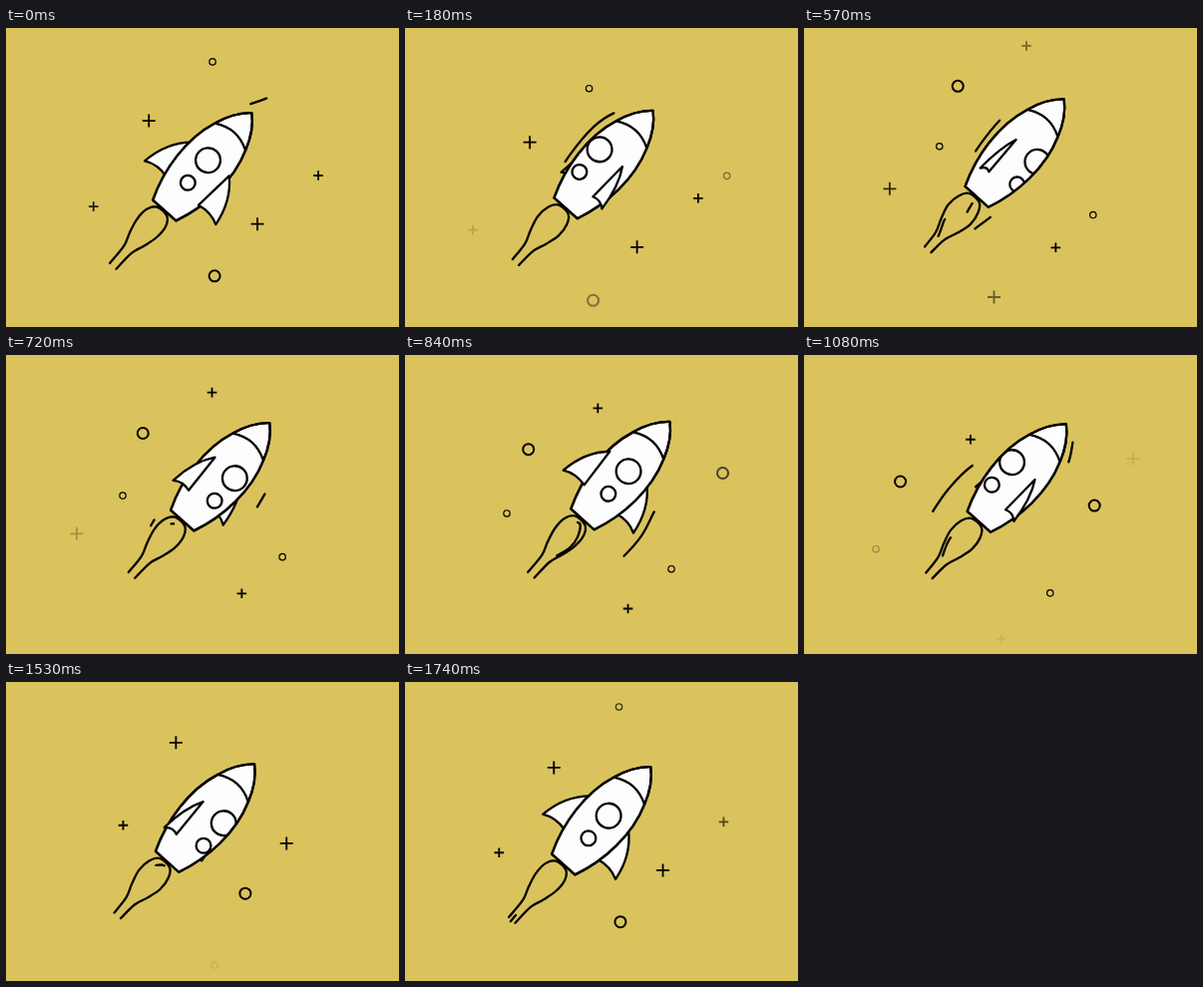
Recreate the animation shown at these times as an HTML page. Size 394 by 300 pixels, loop 1770 ms.

```html
<!DOCTYPE html>
<html lang="en">
<head>
<meta charset="utf-8">
<title>Rocket</title>
<style>
  html, body { margin: 0; width: 100%; height: 100%; overflow: hidden; background: #dac25d; }
  svg { display: block; width: 100vw; height: 100vh; }
  path, circle { fill: none; stroke: #000; stroke-width: 2.3; stroke-linecap: round; stroke-linejoin: round; }
  .solid { fill: #fdfdfd; }
  #sky path { stroke-linecap: butt; }
</style>
</head>
<body>
<svg viewBox="0 0 394 300">
  <defs><clipPath id="hull"><path id="hullShape"/></clipPath></defs>
  <g id="sky"></g>
  <g id="rocket">
    <g id="air"></g>
    <path id="flame"/>
    <g id="sparks"></g>
    <g id="backFins"></g>
    <path id="body" class="solid"/>
    <g clip-path="url(#hull)"><g id="windows"></g><path d="M-20.5-99Q0-111 20.5-99"/></g>
    <path id="outline"/>
    <g id="frontFins"></g>
  </g>
</svg>
<script>
const LOOP = 1770, STEP = 30, CYCLE = 1800, HALF = CYCLE / 2;
const $ = id => document.getElementById(id);
const clamp = x => Math.max(0, Math.min(1, x));
const mod = (a, n) => ((a % n) + n) % n;

function add(parent, tag, attrs = {}) {
  const el = document.createElementNS('http://www.w3.org/2000/svg', tag);
  for (const key in attrs) el.setAttribute(key, attrs[key]);
  parent.appendChild(el);
  return el;
}

// Smooth curve through a few points (Catmull-Rom).
function spline(points) {
  const at = i => points[Math.max(0, Math.min(points.length - 1, i))];
  let d = 'M' + points[0];
  for (let i = 0; i < points.length - 1; i++) {
    const [a, b, c, e] = [at(i - 1), at(i), at(i + 1), at(i + 2)];
    const c1 = b.map((v, k) => v + (c[k] - a[k]) / 6);
    const c2 = c.map((v, k) => v - (e[k] - b[k]) / 6);
    d += `C${c1} ${c2} ${c}`;
  }
  return d;
}

const scaleX = (points, k) => points.map(([x, y]) => [x * k, y]);

// Sky marks enter at the top or right edge of a field, drift down-left
// and fade near its borders.
const FIELD = { left: 64, right: 332, top: 8, bottom: 287 };
const SLOPE = 1.191;
const marks = [];

function addMark(shape, big, enter, x, y, speed) {
  const r = shape === 'ring' ? (big ? 5.5 : 3.2) : (big ? 6.5 : 4.8);
  const el = shape === 'ring'
    ? add($('sky'), 'circle', { r })
    : add($('sky'), 'path', { d: `M${-r} 0H${r}M0 ${-r}V${r}` });
  el.style.strokeWidth = shape === 'ring' ? (big ? 2 : 1.2) : 1.8;
  marks.push({ el, enter, x, y, speed });
}
const fromTop = (shape, big, enter, x, speed) => addMark(shape, big, enter, x, FIELD.top, speed);
const fromRight = (shape, big, enter, y, speed) => addMark(shape, big, enter, FIELD.right, y, speed);

fromTop('ring', true, 196, 196.5, .113);
fromTop('plus', false, 494, 231.4, .11);
fromTop('plus', true, 1089, 214.7, .1005);
fromTop('ring', false, 1626, 228.8, .125);
fromRight('ring', false, 70, 137.3, .0844);
fromRight('ring', true, 722, 102.5, .114);
fromRight('plus', true, 1060, 101.5, .108);
fromRight('plus', false, 1622, 125.4, .1065);

function drawMark({ el, enter, x, y, speed }, t) {
  const path = mod(t - enter, CYCLE) * speed;
  const px = x - path, py = y + path * SLOPE;
  const alpha = clamp(Math.min(
    (px - FIELD.left) / 28, (FIELD.right - px) / 20,
    (py - FIELD.top) / 22, (FIELD.bottom - py) / 33));
  el.setAttribute('transform', `translate(${px} ${py})`);
  el.setAttribute('opacity', alpha);
}

// Streaks run along a curve at constant speed; each run is [start, length].
const streaks = [];
function stream(parent, points, speed, ...runs) {
  const d = spline(points);
  for (const [start, length] of runs) {
    const el = add(parent, 'path', { d });
    streaks.push({ el, start, speed, length, total: el.getTotalLength() });
  }
}

function drawStreak({ el, start, speed, length, total }, v) {
  const head = mod(v - start, CYCLE) * speed;
  const from = Math.max(0, head - length), to = Math.min(total, head);
  el.style.display = to - from > 1.2 ? '' : 'none';
  el.style.strokeDasharray = `${Math.max(0, to - from)} 999`;
  el.style.strokeDashoffset = -from;
}

const hullFlow = [[-1.4, -152], [7, -137], [26, -107], [33.5, -80], [32.5, -42], [25, 0], [20, 25]];
const finFlow = [[40, -75], [44, -54], [50, -28], [50.5, 0], [47, 23]];
const innerFlame = [[-6, 10], [1, 5], [8, 16], [9.5, 29], [4, 48], [-1.2, 64], [-1.4, 78]];
stream($('air'), scaleX(hullFlow, -1), .6, [1792, 70], [387, 39], [1142, 61]);
stream($('air'), hullFlow, .5, [224, 20], [1008, 20]);
stream($('air'), scaleX(finFlow, -.88), .5, [918, 62]);
stream($('air'), scaleX(finFlow, 1.1), .5, [722, 54]);
stream($('sparks'), innerFlame, .4, [206, 19], [368, 7], [746, 45], [1162, 28], [1314, 7], [1555, 16]);
stream($('sparks'), [[-8, 14], [-10.5, 30], [-8.3, 40], [-2, 57], [-1.5, 75]], .4, [493, 18], [1026, 20]);
stream($('sparks'), [[1, 8], [3, 18]], .4, [361, 10], [575, 10]);

const hull = 'M-15.6 0C-28-30-32-68-20.5-99C-17.5-108-11-122 0-131.3' +
  'C11-122 17.5-108 20.5-99C32-68 28-30 15.6 0Z';
for (const id of ['hullShape', 'body', 'outline']) $(id).setAttribute('d', hull);

const SPACING = 64;
const portholes = [0, 1].map(() => {
  const g = add($('windows'), 'g');
  add(g, 'circle', { cx: .5, cy: -66.6, r: 12.4 });
  add(g, 'circle', { cx: .5, cy: -36.3, r: 7.4 });
  return g;
});

const fins = [0, HALF].map(lag => ({
  lag,
  front: add($('frontFins'), 'path', { class: 'solid' }),
  back: add($('backFins'), 'path', { class: 'solid' })
}));

// A fin sweeps right to left in front of the hull, then back behind it.
function drawFin({ lag, front, back }, v) {
  const turn = mod(v + lag, CYCLE) / HALF;
  const isFront = turn > .01 && turn < .985;
  const x = 50 * (turn < 1 ? 1 - 2 * turn : 2 * turn - 3);
  const d = `M${x * .53}-69Q${x * .92}-52 ${x}-23.8Q${x * .76}-30 ${x * .46}-26.8Z`;
  front.setAttribute('d', isFront ? d : '');
  back.setAttribute('d', isFront ? '' : d);
}

function drawFlame(v) {
  const pulse = Math.sin(v / HALF * Math.PI) ** 2;
  const swell = 1 + .14 * pulse;
  const half = [[4.3, 76 - 5.2 * pulse], [5.2 * swell, 54], [9.8 * swell, 40],
    [13.4 * swell, 25], [12.8, 11], [6.5, 2.4]];
  const points = [...scaleX(half, -1), ...half.reverse()];
  $('flame').setAttribute('d', spline(points.map(([x, y]) => [x - 1.2, y])));
}

function render(t) {
  const v = mod(20 + t * CYCLE / LOOP, CYCLE);
  const lift = (1 - Math.cos(v / CYCLE * 2 * Math.PI)) / 2;
  $('rocket').setAttribute('transform',
    `translate(${158.8 + 19.2 * lift} ${183 - 18.2 * lift}) rotate(41.8)`);
  const shift = mod(-v / HALF * SPACING, SPACING);
  portholes.forEach((g, i) => g.setAttribute('transform', `translate(${shift - i * SPACING} 0)`));
  fins.forEach(fin => drawFin(fin, v));
  drawFlame(v);
  streaks.forEach(s => drawStreak(s, v));
  marks.forEach(m => drawMark(m, t));
}

const begin = performance.now();
function tick() {
  const t = (performance.now() - begin) % LOOP;
  render(Math.floor(t / STEP) * STEP);
  requestAnimationFrame(tick);
}
tick();
</script>
</body>
</html>
```
